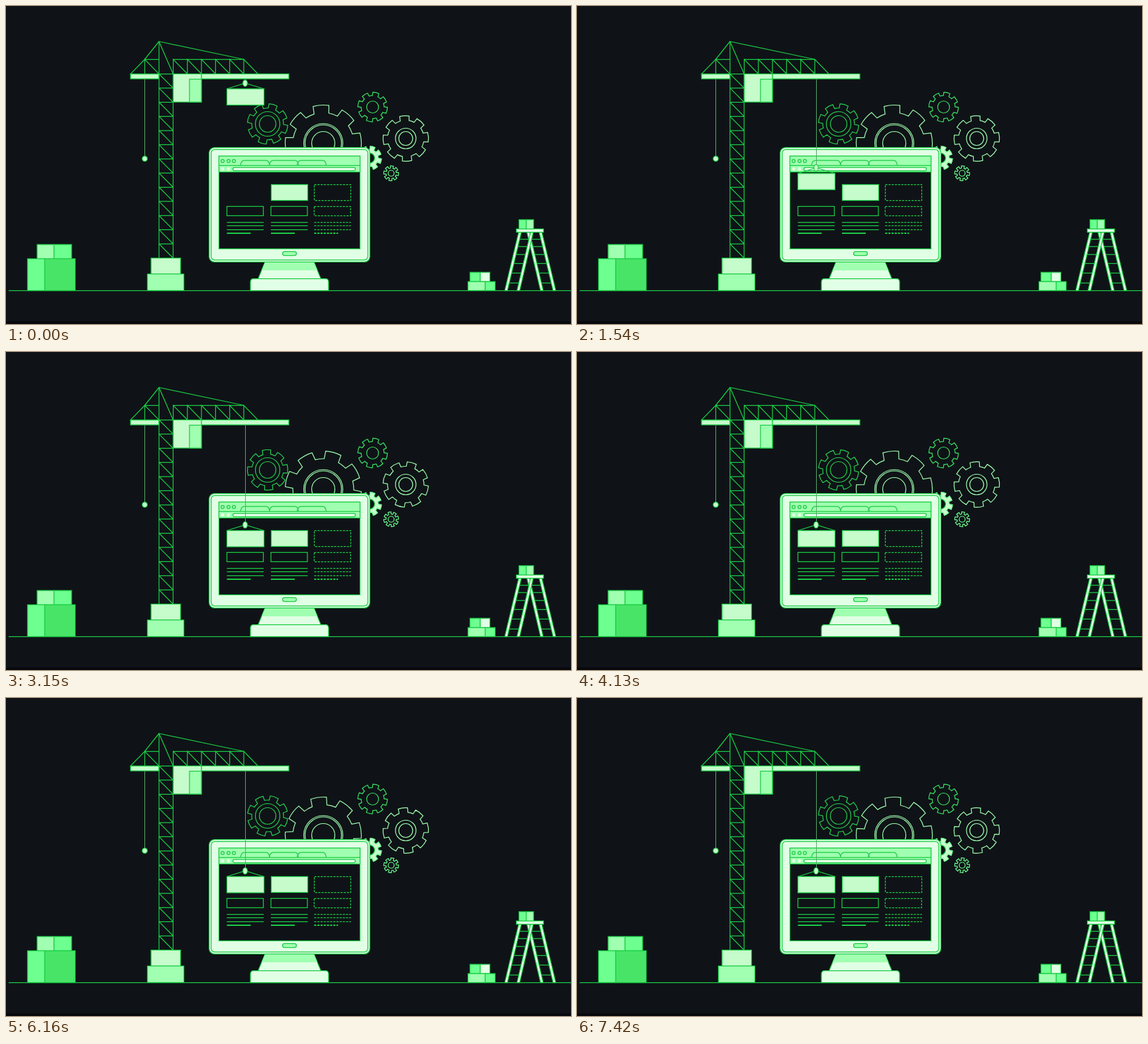
These frames come from a looping animation (853x480 px, 7490 ms). An HTML page:

```html
<!DOCTYPE html>
<html lang="en">
<head>
<meta charset="utf-8">
<title>Building a web page</title>
<style>
  html, body { margin: 0; width: 100%; height: 100%; overflow: hidden; background: #0f1317; }
  svg { display: block; width: 100vw; height: 100vh; }
</style>
</head>
<body>
<svg id="stage" viewBox="0 0 853 480"></svg>
<script>
const BG = '#0f1317', LINE = '#1bcb45', DEEP = '#48e468', MID = '#6dff90',
  SOFT = '#a0ffb0', PALE = '#c6fbcb', WHITE = '#e1ffe5', ROPE = '#56a868';

const LOOP = 7490, TICK = 70;
const DROP = { start: 105, end: 1995, distance: 144.5 };
const SPIN = { start: 2100, end: 7440 };

const box = (x1, y1, x2, y2, fill = 'none', extra = '') =>
  `<rect x="${x1}" y="${y1}" width="${x2 - x1}" height="${y2 - y1}" fill="${fill}" ${extra}/>`;
const path = (d, extra = '') => `<path d="${d}" ${extra}/>`;
const circle = (x, y, r, fill = 'none', extra = '') =>
  `<circle cx="${x}" cy="${y}" r="${r}" fill="${fill}" ${extra}/>`;
const repeat = (n, draw) => Array.from({ length: n }, (_, i) => draw(i)).join('');

function gearPath(outer, root) {
  const point = (r, deg) => {
    const a = deg * Math.PI / 180;
    return `${(r * Math.sin(a)).toFixed(2)} ${(-r * Math.cos(a)).toFixed(2)}`;
  };
  const teeth = repeat(8, i => {
    const a = i * 45;
    return `${i ? `A${root} ${root} 0 0 1 ` : 'M'}${point(root, a - 14)}L${point(outer, a - 12)}` +
      `A${outer} ${outer} 0 0 1 ${point(outer, a + 12)}L${point(root, a + 14)}`;
  });
  return teeth + `A${root} ${root} 0 0 1 ${point(root, -14)}Z`;
}

// spin: -1 counter-clockwise, 1 clockwise, 0 still
const gears = [
  { x: 395, y: 178, outer: 30.5, root: 24, holes: [18.5, 12.5], angle: 16, spin: 1, color: '#27cf50' },
  { x: 479, y: 207, outer: 57.5, root: 46, holes: [29.5, 27.5, 17.5], angle: -3.5, spin: -1, color: SOFT },
  { x: 553.5, y: 152.5, outer: 22.3, root: 17.3, holes: [9], angle: 13, spin: 0, color: '#3be263' },
  { x: 603.5, y: 200, outer: 34.3, root: 27.5, holes: [15.5, 10.5], angle: -3.5, spin: -1, color: SOFT },
  { x: 581.5, y: 252.5, outer: 11.2, root: 7.8, holes: [4.5], angle: 6, spin: 1, color: MID }
];

const drawGear = g => `<g transform="translate(${g.x} ${g.y})" stroke="${g.color}" stroke-width="1.2">
  ${path(gearPath(g.outer, g.root), 'class="teeth"')}${g.holes.map(r => circle(0, 0, r)).join('')}</g>`;

function crane() {
  const cell = 21.38;
  const mast = repeat(13, i => {
    const y = 102.5 + i * cell;
    return path(`M231 ${y}H252.3L231 ${y}M231 ${y}L252.3 ${y + cell}`);
  });
  const truss = repeat(6, i => {
    const x = 252.5 + i * 21.3;
    return path(`M${x} 102.5V80.5L${x + 21.3} 102.5`);
  });
  return box(188, 102.5, 231, 110, PALE) + box(295, 102.5, 427, 110, PALE) +
    box(252.5, 102.5, 295, 145, PALE) + box(277, 110.5, 295, 145, SOFT) +
    path('M231 380V53.5M252.3 102.5V380') + mast + truss +
    path('M252.5 80.5H359L231 53.5L252.3 102.5M231 53.5L209.5 80.5L188 102.5H231L209.5 80.5V102.5M209.5 80.5H231') +
    path('M209.5 110.5V227', `stroke="${ROPE}" stroke-width="1"`) + circle(209.5, 230.5, 3.8, PALE) +
    box(219, 380.5, 263.5, 404.5, PALE) + box(213.5, 404.5, 268.5, 429.5, SOFT);
}

function boxes() {
  return box(47, 360, 72.5, 381.5, SOFT) + box(72.5, 360, 99, 381.5, MID) +
    box(32.5, 381.5, 58.5, 429.5, MID) + box(58.5, 381.5, 104.5, 429.5, DEEP) +
    box(700.5, 402, 716, 416, MID) + box(716, 402, 730.5, 416, WHITE) +
    box(697.5, 416, 723.5, 429.5, SOFT) + box(723.5, 416, 738.5, 429.5, MID);
}

function ladder() {
  const leg = (x1, x2) => path(`M${x1 - 2} 341.5H${x1 + 2}L${x2 + 2} 429.5H${x2 - 2}Z`, `fill="${WHITE}"`);
  const rungs = [352, 363, 375, 388.5, 403, 418].map(y => {
    const shift = (y - 341.5) * 0.239;
    return path(`M${776 - shift} ${y}h18M${789 + shift} ${y}h18`);
  }).join('');
  return rungs + leg(788.5, 809) + leg(807, 828) + leg(776, 755) + leg(794, 773.5) +
    box(770.5, 336.5, 811.5, 341.5, WHITE) +
    box(774.5, 322.5, 785.5, 336.5, MID) + box(785.5, 322.5, 796.5, 336.5, SOFT);
}

function monitor() {
  const tab = x => path(`M${x} 240.5Q${x + 1} 233 ${x + 6} 233H${x + 39}Q${x + 43} 233 ${x + 44} 240.5`);
  const column = (x, dash) => `<g ${dash ? 'stroke-dasharray="3.2 1.6"' : ''}>` +
    box(x, 302.5, x + 55, 316.5) + path(`M${x} 326.5h55.5M${x} 331.5h55.5M${x} 337.5h55.5`) +
    path(`M${x} 343h36`, 'stroke-width="1.8"') + '</g>';
  return path('M391 386.5H465L475.5 412H380.5Z', `fill="${WHITE}"`) +
    path('M391 387H465L470 399H386Z', `fill="${SOFT}" stroke="none"`) +
    path('M369 429.5V416.5Q369 411.5 374 411.5H482Q487 411.5 487 416.5V429.5Z', `fill="${WHITE}"`) +
    box(306.7, 213.7, 549.3, 386.3, WHITE, 'rx="8"') + box(309.7, 216.7, 546.3, 383.3, 'none', 'rx="5.5"') +
    box(321.5, 226.5, 534.5, 366.5, BG) + box(321.5, 226.5, 534.5, 250.5, SOFT) +
    path('M321.5 240.5H534.5') + [327, 336, 344].map(x => circle(x, 234, 2.4)).join('') +
    [354, 397.5, 439.5].map(tab).join('') +
    [327, 336].map(x => circle(x, 245.8, 2.6, WHITE, 'stroke="none"')).join('') +
    box(342.5, 243.5, 527.5, 248.5, WHITE, 'rx="2.5"') +
    box(417.5, 370.5, 438.5, 376.5, SOFT, 'rx="3"') +
    box(400.5, 269.5, 455.5, 293.5, PALE) +
    box(465.5, 269.5, 520.5, 293.5, 'none', 'stroke-dasharray="3.2 1.6"') +
    column(333.5) + column(400) + column(465.3, true);
}

const load = `<path id="rope" stroke="${ROPE}" stroke-width="1"/><g id="load">` +
  path('M333.5 125L361 116.5L389.5 125') + box(333.5, 125, 389.5, 149.5, PALE) +
  `<ellipse cx="361" cy="116.5" rx="3.4" ry="4.8" fill="${PALE}"/></g>`;

const stage = document.getElementById('stage');
stage.innerHTML = box(0, 0, 853, 480, BG) + box(0, 476, 853, 480, '#07090c') +
  `<g fill="none" stroke="${LINE}" stroke-width="1.25">` +
  gears.map(drawGear).join('') +
  `<g transform="translate(549 229.5)">${path(gearPath(18, 13) , `fill="${PALE}" stroke="${MID}" transform="rotate(15)"`)}` +
  circle(0, 0, 7.5, BG) + '</g>' +
  path('M4 429.5H853') + crane() + boxes() + ladder() + monitor() + load + '</g>';

const teeth = stage.querySelectorAll('.teeth');
const rope = document.getElementById('rope');
const loadGroup = document.getElementById('load');

const progress = (t, span) => Math.min(1, Math.max(0, (t - span.start) / (span.end - span.start)));
const easeInOut = p => p < 0.5 ? 2 * p * p : 1 - 2 * (1 - p) ** 2;

function render(time) {
  const t = Math.floor((time % LOOP) / TICK) * TICK;
  const drop = DROP.distance * easeInOut(progress(t, DROP));
  loadGroup.setAttribute('transform', `translate(0 ${drop})`);
  rope.setAttribute('d', `M361.5 110.5V${112 + drop}`);
  const turn = 360 * progress(t, SPIN);
  gears.forEach((g, i) => teeth[i].setAttribute('transform', `rotate(${g.angle + g.spin * turn})`));
}

const begin = performance.now();
function frame() {
  render(performance.now() - begin);
  requestAnimationFrame(frame);
}
frame();
</script>
</body>
</html>
```
